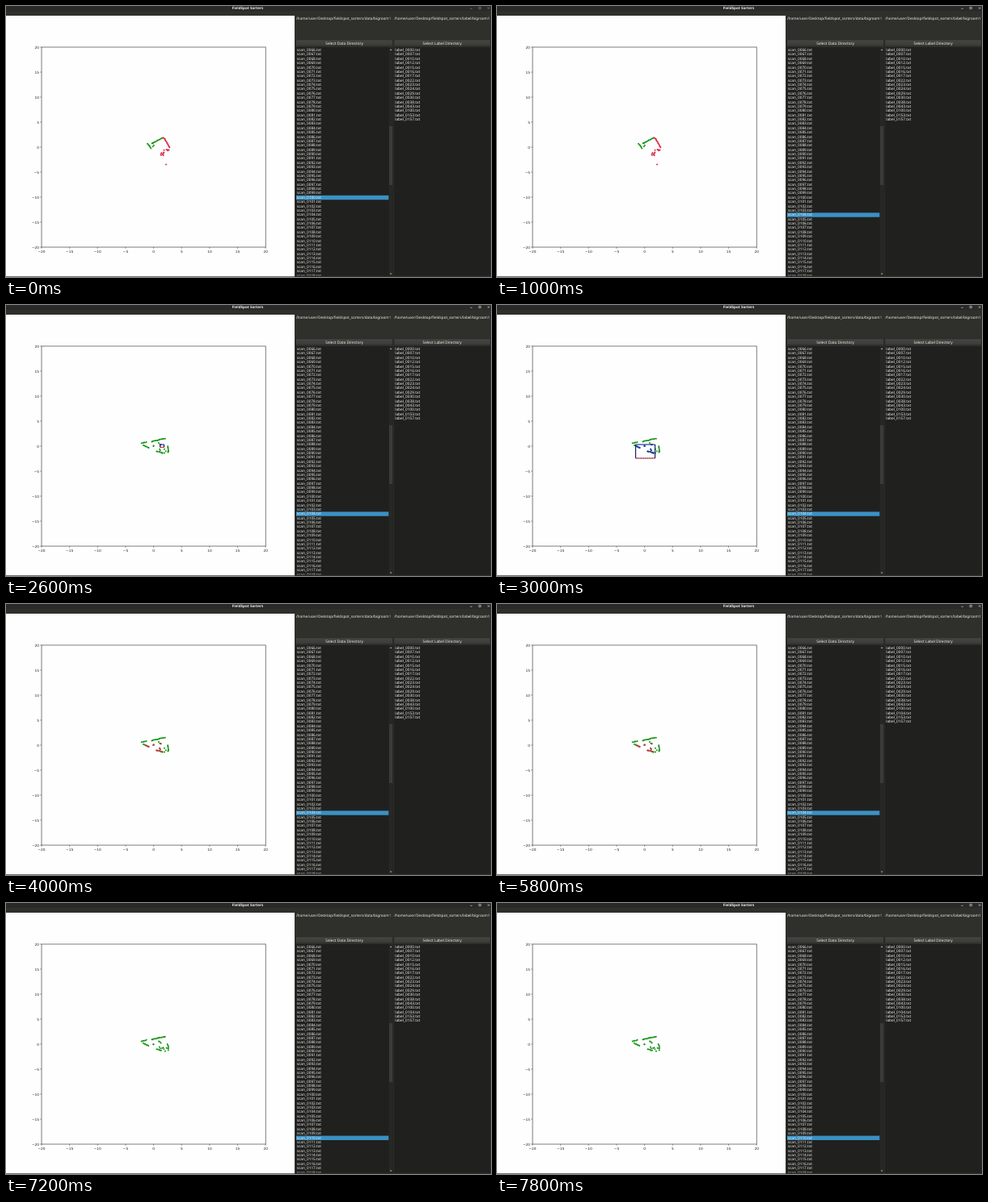
An HTML page with a canvas that plays this animation: 600 px wide and 336 px high, repeating every 8 s.

```html
<!DOCTYPE html>
<html lang="en">
<head>
<meta charset="utf-8">
<title>FieldSpot Sorters</title>
<style>
html, body { margin: 0; width: 100%; height: 100%; overflow: hidden; background: #2f302c; }
canvas { display: block; width: 600px; height: 336px; }
</style>
</head>
<body>
<canvas id="stage" width="600" height="336"></canvas>
<script>
const ctx = document.getElementById('stage').getContext('2d');
const LOOP = 8000, ROW = 5.375, TOP = 54.4;
const UI = '"Noto Sans", sans-serif', PLOT = '"DejaVu Sans", sans-serif';
const GREEN = '#129312', RED = '#d8304a', BLUE = '#2336b4';
const area = { left: 171.5, top: 173, right: 195.5, bottom: 190 };

// A seeded sensor: walls are sampled at an even pitch, clouds are scattered.
function sensor(seed) {
  const spread = () => {
    seed = (seed * 16807) % 2147483647;
    return seed / 1073741823.5 - 1;
  };
  return {
    wall(x1, y1, x2, y2) {
      const n = Math.round(Math.hypot(x2 - x1, y2 - y1) / 1.4);
      return Array.from({ length: n + 1 }, (_, i) => [
        x1 + (x2 - x1) * i / n + spread() * 0.3,
        y1 + (y2 - y1) * i / n + spread() * 0.3
      ]);
    },
    cloud: (x, y, rx, ry, n) =>
      Array.from({ length: n }, () => [x + spread() * rx, y + spread() * ry])
  };
}

function scanCorner() {
  const { wall, cloud } = sensor(71);
  return {
    green: [
      wall(175.3, 170.8, 179.4, 176.2), wall(180.4, 170.4, 193.2, 163.8),
      cloud(182, 171.5, 1, 3, 3)
    ].flat(),
    red: [
      wall(194.4, 163, 196.5, 165), wall(196.5, 165, 202.6, 175.6),
      cloud(199.5, 178.5, 2.5, 0.8, 5), cloud(193.5, 182, 2.2, 4, 9),
      cloud(198, 196.4, 0, 0, 1)
    ].flat()
  };
}

function scanRoom(seed) {
  const { wall, cloud } = sensor(seed);
  return [
    wall(168, 171.5, 173.5, 170), wall(180.3, 169.2, 196.5, 165.7),
    wall(170, 174, 176.5, 177), wall(189, 171.3, 191.6, 173.4),
    wall(186.5, 181.2, 192, 183), wall(190, 178.8, 191, 180.4),
    wall(200, 175.2, 201, 179.4), cloud(182.4, 174.9, 0.7, 0.4, 2),
    cloud(197, 181.5, 4, 3, 8)
  ].flat();
}

const corner = scanCorner(), room = scanRoom(23), nextRoom = scanRoom(57);
const labels = [0, 7, 10, 12, 15, 16, 17, 22, 23, 24, 29, 30, 38, 43, 100, 153, 157];
const savedLabels = [...labels, 104].sort((a, b) => a - b);
const selections = [[0, 100], [1000, 104], [5900, 105], [7200, 110], [7300, 109], [7800, 110]];
const fileName = (kind, n) => `${kind}_${String(n).padStart(4, '0')}.txt`;

function box(x, y, w, h, color) {
  ctx.fillStyle = color;
  ctx.fillRect(x, y, w, h);
}

function line(x1, y1, x2, y2, color, width = 0.6) {
  ctx.strokeStyle = color;
  ctx.lineWidth = width;
  ctx.beginPath();
  ctx.moveTo(x1, y1);
  ctx.lineTo(x2, y2);
  ctx.stroke();
}

function clipped(x, y, w, h, paint) {
  ctx.save();
  ctx.beginPath();
  ctx.rect(x, y, w, h);
  ctx.clip();
  paint();
  ctx.restore();
}

function text(str, x, y, { size = 4.75, color = '#f0f0ed', align = 'left', font = UI, weight = 400 } = {}) {
  ctx.font = `${weight} ${size}px ${font}`;
  ctx.fillStyle = color;
  ctx.textAlign = align;
  ctx.textBaseline = 'alphabetic';
  ctx.fillText(str, x, y + size * 0.36);
}

function dots(points, color) {
  ctx.fillStyle = color;
  for (const [x, y] of points) {
    ctx.beginPath();
    ctx.arc(x, y, 1, 0, Math.PI * 2);
    ctx.fill();
  }
}

function drawTitle(t) {
  const color = t >= 1000 ? '#d8d8d5' : '#858582';
  box(0, 0, 600, 6, '#292a28');
  text('FieldSpot Sorters', 299, 2.6, { size: 4.55, weight: 700, align: 'center' });
  line(574.2, 3.3, 576.8, 3.3, color);
  ctx.strokeRect(585, 1.6, 2.2, 2.2);
  line(595.8, 1.3, 598.4, 3.9, color);
  line(598.4, 1.3, 595.8, 3.9, color);
}

function drawAxes() {
  box(0, 12, 357, 323.3, '#fefefe');
  ctx.strokeStyle = '#444';
  ctx.lineWidth = 0.7;
  ctx.strokeRect(44, 51, 277.2, 248);
  const style = { size: 4.3, color: '#222', font: PLOT };
  for (let v = -20; v <= 20; v += 5) {
    const x = 182.6 + v * 6.93, y = 175 - v * 6.2;
    const name = String(v).replace('-', '\u2212');
    line(x, 299, x, 300.7, '#444');
    line(42.3, y, 44, y, '#444');
    text(name, x, 304, { ...style, align: 'center' });
    text(name, 41, y + 0.2, { ...style, align: 'right' });
  }
}

function drawSelector(t) {
  if (t >= 1700 && t < 2600) line(196.4, 166, 196.4, t < 1900 ? 168.5 : 171, BLUE, 1.2);
  if (t < 2600 || t >= 3200) return;
  const p = Math.min(1, Math.floor((t - 2500) / 100) / 5);
  const { right, top } = area;
  const left = right + (area.left - right) * p, bottom = top + (area.bottom - top) * p;
  line(left, top, right, top, BLUE, 1.2);
  line(left, top, left, bottom, '#181c62', 1.2);
  line(right, top, right, bottom, '#181c62', 1.2);
  line(left, bottom, right, bottom, '#26202a', 0.6);
  ctx.setLineDash([2, 0.8]);
  line(left, bottom, right, bottom, '#d62234', 1.2);
  ctx.setLineDash([]);
}

function drawScan(t) {
  if (t < 1100) {
    dots(corner.green, GREEN);
    dots(corner.red, RED);
  } else if (t < 6100) {
    // The picked area loses its right edge once corrected.
    const right = t < 3700 ? area.right : 192.5;
    const inside = ([x, y]) => x > area.left && x < right && y > area.top && y < area.bottom;
    dots(room, GREEN);
    if (t >= 3000) dots(room.filter(inside), t < 3200 ? BLUE : RED);
    drawSelector(t);
  } else {
    dots(nextRoom, GREEN);
  }
}

function drawButton(x, w, str) {
  const shade = ctx.createLinearGradient(0, 42, 0, 50);
  shade.addColorStop(0, '#454641');
  shade.addColorStop(1, '#393a36');
  box(x, 41.8, w, 8.2, '#20211e');
  box(x + 0.4, 42.2, w - 0.8, 7.4, shade);
  text(str, x + w / 2, 45.9, { align: 'center' });
}

function drawPath(str, x, w) {
  clipped(x, 11, w, 9, () => text(str, x + 0.3, 15.1, { size: 4.62 }));
}

function drawArrow(y, dir) {
  ctx.fillStyle = '#c8c8c4';
  ctx.beginPath();
  ctx.moveTo(474.8, y);
  ctx.lineTo(477.4, y);
  ctx.lineTo(476.1, y + dir * 1.6);
  ctx.fill();
}

function drawScrollbar() {
  box(473.6, 51, 5, 283.5, '#272824');
  box(474, 149, 4.2, 73, '#3b3c38');
  drawArrow(55, -1);
  drawArrow(331.4, 1);
}

function drawLists(t) {
  const selected = selections.filter(([at]) => at <= t).pop()[1];
  for (let n = 66; n <= 118; n++) {
    const y = TOP + (n - 66) * ROW;
    if (n === selected) box(359, y - 2.3, 114.5, ROW, '#3a91c5');
    text(fileName('scan', n), 359.7, y);
  }
  (t < 4700 ? labels : savedLabels).forEach((n, i) =>
    text(fileName('label', n), 481.2, TOP + i * ROW));
}

function drawPanel(t) {
  drawPath('/home/user/Desktop/fieldspot_sorters/data/bigroom1', 358.6, 117);
  drawPath('/home/user/Desktop/fieldspot_sorters/label/bigroom1', 480, 118);
  drawButton(358.6, 120, 'Select Data Directory');
  drawButton(479.8, 119.6, 'Select Label Directory');
  box(358.4, 51, 120.4, 283.7, '#20211e');
  box(479.8, 51, 119.6, 283.7, '#20211e');
  clipped(358.4, 51, 241, 283.5, () => drawLists(t));
  drawScrollbar();
}

function draw(now) {
  const t = now % LOOP;
  ctx.textRendering = 'geometricPrecision';
  box(0, 0, 600, 336, '#2f302c');
  drawTitle(t);
  drawAxes();
  drawScan(t);
  drawPanel(t);
}

const start = performance.now();
function tick() {
  draw(performance.now() - start);
  requestAnimationFrame(tick);
}
tick();
</script>
</body>
</html>
```
